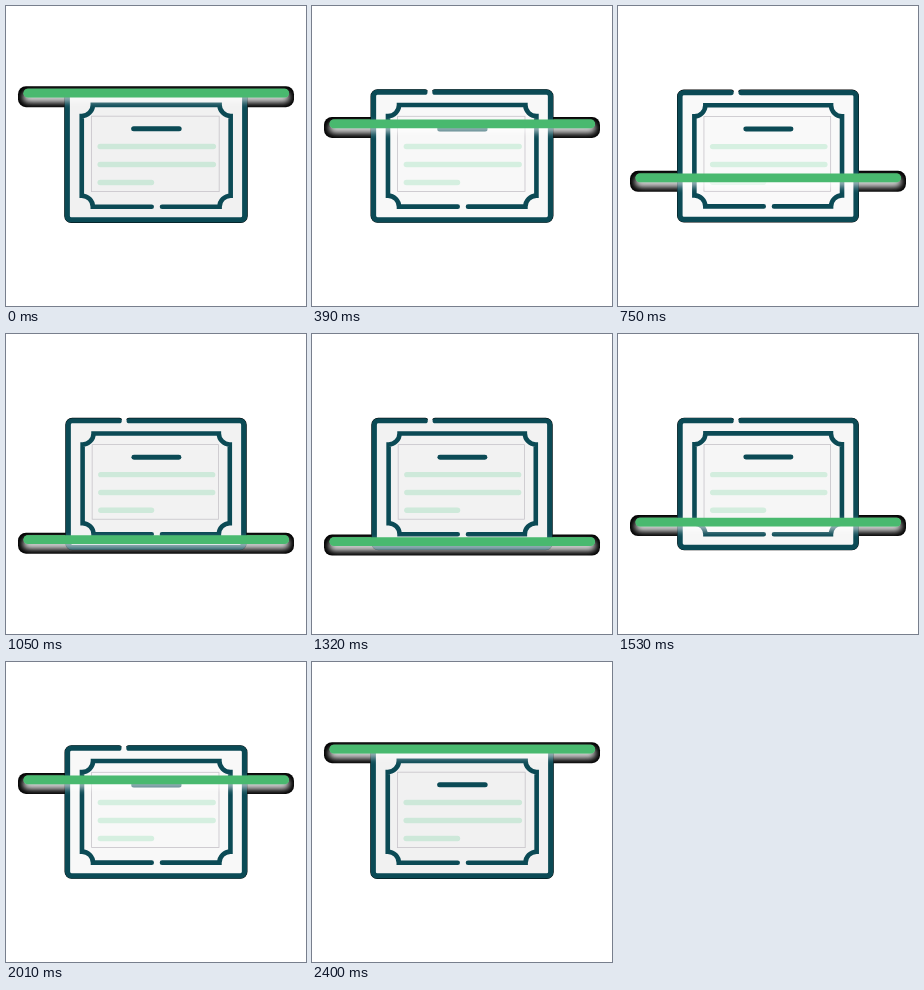
An HTML page with a canvas that plays this animation: 300 by 300 pixels, repeating every 2.46 s.

```html
<!DOCTYPE html>
<html lang="en">
<head>
<meta charset="utf-8">
<title>Document scan</title>
<style>
html, body { margin: 0; width: 100%; height: 100%; overflow: hidden; background: #fff; }
canvas { display: block; width: 300px; height: 300px; }
</style>
</head>
<body>
<canvas id="stage" width="300" height="300"></canvas>
<script>
const ctx = document.getElementById('stage').getContext('2d');
const LOOP = 2460, HALF = 1200, STEP = 30;
const INK = '#0b4a55', GREEN = '#49b96f';

const mix = (a, b, k) => a + (b - a) * k;
const smooth = u => u * u * (3 - 2 * u);

function stroke(path, color, width) {
  ctx.strokeStyle = color;
  ctx.lineWidth = width;
  ctx.stroke(path);
}

function line(x1, x2, y, color, width) {
  const path = new Path2D();
  path.moveTo(x1, y);
  path.lineTo(x2, y);
  stroke(path, color, width);
}

function pill(x, y, w, h, r, color) {
  ctx.fillStyle = color;
  ctx.beginPath();
  ctx.roundRect(x, y, w, h, r);
  ctx.fill();
}

// Rounded outer border, open at the top
function outerBorder() {
  const l = 61.8, r = 238.2, t = 86.4, b = 213.6, c = 4;
  const p = new Path2D();
  p.moveTo(123, t);
  p.arcTo(r, t, r, b, c);
  p.arcTo(r, b, l, b, c);
  p.arcTo(l, b, l, t, c);
  p.arcTo(l, t, r, t, c);
  p.lineTo(113, t);
  return p;
}

// Inner border with concave corners, open at the bottom
function innerBorder() {
  const l = 76.2, r = 224.2, t = 99.2, b = 200.5, c = 11, q = Math.PI / 2;
  const p = new Path2D();
  p.moveTo(145.7, b);
  p.arc(l, b, c, 0, -q, true);
  p.arc(l, t, c, q, 0, true);
  p.arc(r, t, c, 2 * q, q, true);
  p.arc(r, b, c, -q, -2 * q, true);
  p.lineTo(156, b);
  return p;
}

const outer = outerBorder(), inner = innerBorder();

function drawCard(progress) {
  const light = Math.sin(Math.PI * progress);
  const grey = mix(241, 251, light);
  const scale = mix(1.006, 0.994, progress);
  const mint = `rgb(${mix(205, 216, light)},${mix(232, 242, light)},${mix(217, 227, light)})`;

  ctx.save();
  ctx.translate(150, 150);
  ctx.scale(scale, scale);
  ctx.translate(-150, -150);
  ctx.lineCap = 'round';

  stroke(outer, '#000', 6);
  pill(61, 85.5, 178, 129, 4, `rgb(${grey},${grey},${grey})`);
  stroke(outer, INK, 5.2);
  stroke(inner, INK, 4.6);

  ctx.strokeStyle = '#c6c3c9';
  ctx.lineWidth = 0.8;
  ctx.strokeRect(85.8, 110.4, 127, 75);

  line(127.8, 173, 123, INK, 5);
  line(94.5, 207, 140.6, mint, 5.4);
  line(94.5, 207, 158.5, mint, 5.4);
  line(94.5, 145.5, 176.4, mint, 5.4);
  ctx.restore();
}

function drawGlow(y, alpha) {
  ctx.save();
  ctx.shadowColor = `rgba(255,255,255,${alpha})`;
  ctx.shadowBlur = 6;
  ctx.shadowOffsetY = 4;
  pill(17.5, y - 4.4, 265.5, 8.8, 4.4, GREEN);
  ctx.restore();
}

function draw(time) {
  const t = Math.min(Math.floor((time % LOOP) / STEP) * STEP, 2 * HALF);
  const progress = smooth(1 - Math.abs(t / HALF - 1));
  const y = mix(87.2, 211, progress);

  ctx.fillStyle = '#fff';
  ctx.fillRect(0, 0, 300, 300);
  pill(12, y - 7, 276, 21, 8, '#000');
  drawGlow(y, 0.6);
  drawCard(progress);
  drawGlow(y, 0.65);
}

const start = performance.now();
function tick() {
  draw(performance.now() - start);
  requestAnimationFrame(tick);
}
tick();
</script>
</body>
</html>
```
